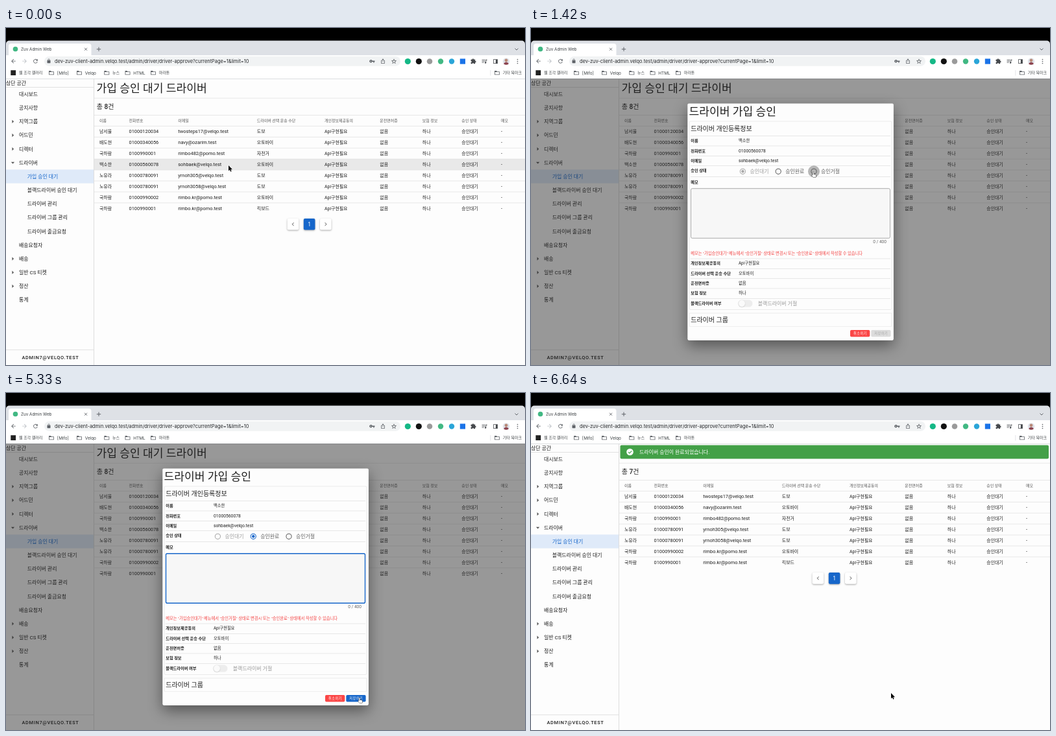
Animation, 800 px wide and 520 px high, one loop 6.73 s. Source, as an HTML page with a canvas:

```html
<!DOCTYPE html>
<html lang="ko">
<head>
<meta charset="utf-8">
<title>Admin</title>
<style>
html, body { margin: 0; width: 100%; height: 100%; overflow: hidden; background: #000; }
canvas { display: block; width: 800px; height: 520px; }
</style>
</head>
<body>
<canvas id="stage"></canvas>
<script>
const LOOP = 6730;
const canvas = document.getElementById('stage');
const g = canvas.getContext('2d');
const dpr = window.devicePixelRatio || 1;
canvas.width = 800 * dpr;
canvas.height = 520 * dpr;

const APP = "Roboto, 'Noto Sans CJK KR', sans-serif";
const UI = "Inter, 'Noto Sans CJK KR', sans-serif";
const INK = '#1f1f1f', GREY = '#5f6368', BLUE = '#1666ca', LINE = '#dedede';

// moments of the story, in ms
const OPEN = 500, PICK = 2060, FOCUS = 3560, DONE = 5870, CLOSE = 5930;

const ICON = {
  back: 'M20 11H7.8l5.6-5.6L12 4l-8 8 8 8 1.4-1.4L7.8 13H20z',
  next: 'M4 11h12.2l-5.6-5.6L12 4l8 8-8 8-1.4-1.4 5.6-5.6H4z',
  reload: 'M17.65 6.35A8 8 0 1 0 19.73 14h-2.08A6 6 0 1 1 12 6c1.66 0 3.14.69 4.22 1.78L13 11h7V4z',
  lock: 'M18 8h-1V6A5 5 0 0 0 7 6v2H6a2 2 0 0 0-2 2v10a2 2 0 0 0 2 2h12a2 2 0 0 0 2-2V10a2 2 0 0 0-2-2zM9 8V6a3 3 0 0 1 6 0v2z',
  key: 'M12.65 10A6 6 0 1 0 12.65 14H17v4h4v-4h2v-4zM7 14a2 2 0 1 1 0-4 2 2 0 0 1 0 4z',
  share: 'M11 15V5.8L8.4 8.4 7 7l5-5 5 5-1.4 1.4L13 5.8V15zM4 9h4v2H6v9h12v-9h-2V9h4v13H4z',
  star: 'M12 2l3 7 7.5.6-5.7 5 1.7 7.4-6.5-4-6.5 4 1.7-7.4-5.7-5L9 9zM12 7l-1.6 3.9-4.2.4 3.2 2.8-1 4.1 3.6-2.2 3.6 2.2-1-4.1 3.2-2.8-4.2-.4z',
  puzzle: 'M20 11h-1V7a2 2 0 0 0-2-2h-4V4a2.5 2.5 0 0 0-5 0v1H4a2 2 0 0 0-2 2v4h1.5a2.7 2.7 0 0 1 0 5H2v4a2 2 0 0 0 2 2h4v-1.5a2.7 2.7 0 0 1 5 0V22h4a2 2 0 0 0 2-2v-4h1a2.5 2.5 0 0 0 0-5z',
  queue: 'M2 5h13v2H2zM2 10h13v2H2zM2 15h8v2H2zM17 5h5v3h-3v9a3 3 0 1 1-2-2.8z',
  panel: 'M3 3h18v18H3zM5 5v14h8V5z',
  folder: 'M2 4h8l2 3h10v13H2zM4 9v9h16V9z',
  left: 'M15.4 7.4L14 6l-6 6 6 6 1.4-1.4-4.6-4.6z',
  right: 'M8.6 16.6L10 18l6-6-6-6-1.4 1.4 4.6 4.6z',
  caret: 'M10 17l5-5-5-5z',
  caretDown: 'M7 10l5 5 5-5z'
};
for (const k in ICON) ICON[k] = new Path2D(ICON[k]);
const ARROW = new Path2D('M0 0V16L3.7 12.6 6.1 18.2 8.7 17 6.3 11.6H11.4z');
const HAND = new Path2D('M5 1.5a1.3 1.3 0 0 1 2.6 0V7l5 1c1.3.3 1.9 1.2 1.7 2.4L13.4 16H6.2L2 10.5c-.8-1.2.6-2.3 1.7-1.4L5 10.3z');

const MENU = ['대시보드', '공지사항', '지역그룹', '어드민', '디렉터', '드라이버', '가입 승인 대기',
  '블랙드라이버 승인 대기', '드라이버 관리', '드라이버 그룹 관리', '드라이버 출금요청',
  '배송요청자', '배송', '일반 CS 티켓', '정산', '통계'];
const CARETS = [2, 3, 4, 12, 13, 14];
const COLS = [144, 189.5, 265.3, 386.8, 491, 576.3, 641.8, 702.3, 763];
const HEAD = ['이름', '전화번호', '이메일', '드라이버 선택 운송 수단', '개인정보제공동의', '운전면허증', '보험 정보', '승인 상태', '메모'];
const REST = ['Api구현필요', '없음', '하나', '승인대기', '-'];
const PEOPLE = [
  ['남서율', '01000120034', 'twosteps17@velqo.test', '도보'],
  ['배도현', '01000340056', 'navy@ozarim.test', '오토바이'],
  ['국하람', '0100990001', 'rimbo482@pomo.test', '자전거'],
  ['백소한', '01000560078', 'sohbaek@velqo.test', '오토바이'],
  ['노유라', '01000780091', 'yrnoh305@velqo.test', '도보'],
  ['노유라', '01000780091', 'yrnoh3058@velqo.test', '도보'],
  ['국하람', '01000990002', 'rimbo.kr@pomo.test', '오토바이'],
  ['국하람', '0100990001', 'rimbo.kr@pomo.test', '킥보드']
];
const CHOSEN = PEOPLE[3];

// pointer stops: time, x, y
const PATH = [[30, 343, 212], [180, 362, 210], [1240, 362, 210], [1410, 435, 222], [1500, 436, 222],
  [1760, 381, 222], [2480, 381, 222], [2640, 425, 290], [2850, 425, 290], [3000, 480, 447],
  [3180, 480, 447], [3500, 430, 285], [3850, 430, 285], [4470, 556, 486], [4550, 556, 486],
  [5000, 545, 470], [5300, 545, 470], [5800, 555, 463]];

const clamp = v => Math.max(0, Math.min(1, v));
const smooth = v => v * v * (3 - 2 * v);

function bezier(x1, y1, x2, y2, x) {
  const at = (a, b, u) => 3 * (1 - u) * (1 - u) * u * a + 3 * (1 - u) * u * u * b + u * u * u;
  let lo = 0, hi = 1;
  for (let i = 0; i < 24; i++) {
    const mid = (lo + hi) / 2;
    if (at(x1, x2, mid) < x) lo = mid; else hi = mid;
  }
  return at(y1, y2, lo);
}

function pointer(t) {
  let a = PATH[0];
  for (const b of PATH) {
    if (t < b[0]) {
      const k = smooth(clamp((t - a[0]) / (b[0] - a[0])));
      return [a[1] + (b[1] - a[1]) * k, a[2] + (b[2] - a[2]) * k];
    }
    a = b;
  }
  return [a[1], a[2]];
}

// y is the middle of the line
function text(s, x, y, size, color = INK, o = {}) {
  if (/[가-힣]/.test(s)) size *= 0.935;
  g.font = `${o.weight || 400} ${size}px ${o.font || APP}`;
  g.textAlign = o.align || 'left';
  g.letterSpacing = (o.gap || 0) + 'px';
  g.fillStyle = color;
  g.fillText(s, x, y + size * 0.36);
}

function rect(x, y, w, h, color) {
  g.fillStyle = color;
  g.fillRect(x, y, w, h);
}

function round(x, y, w, h, r, fill, stroke, width = 0.6) {
  g.beginPath();
  g.roundRect(x, y, w, h, r);
  if (fill) { g.fillStyle = fill; g.fill(); }
  if (stroke) { g.strokeStyle = stroke; g.lineWidth = width; g.stroke(); }
}

function disc(x, y, r, color) {
  g.beginPath();
  g.arc(x, y, r, 0, 7);
  g.fillStyle = color;
  g.fill();
}

function stroke(points, color, width) {
  g.beginPath();
  points.forEach(p => g.lineTo(p[0], p[1]));
  g.strokeStyle = color;
  g.lineWidth = width;
  g.stroke();
}

function icon(name, x, y, size = 10, color = GREY) {
  g.save();
  g.translate(x - size / 2, y - size / 2);
  g.scale(size / 24, size / 24);
  g.fillStyle = color;
  g.fill(ICON[name], 'evenodd');
  g.restore();
}

function shadow(color, blur, dy) {
  g.shadowColor = color;
  g.shadowBlur = blur * dpr;
  g.shadowOffsetY = dy * dpr;
}

function browser() {
  rect(0, 0, 800, 30, '#000');
  round(0, 19.5, 800, 30, [5, 5, 0, 0], '#dee1e6');
  round(4, 24, 127.5, 20, [4, 4, 0, 0], '#fff');
  rect(0, 42, 800, 36, '#fff');
  disc(14.5, 32.5, 3.8, '#41b883');
  text('Zuv Admin Web', 23, 32.7, 6.35, '#3c4043', { font: UI });
  const x = 123, y = 32.7;
  stroke([[x - 2, y - 2], [x + 2, y + 2]], GREY, 0.9);
  stroke([[x + 2, y - 2], [x - 2, y + 2]], GREY, 0.9);
  stroke([[139.8, y], [146.2, y]], GREY, 1);
  stroke([[143, y - 3.2], [143, y + 3.2]], GREY, 1);
  stroke([[784.5, 31.5], [787, 34], [789.5, 31.5]], GREY, 1);

  round(59, 43.7, 549, 15, 7.5, '#f1f3f4');
  icon('back', 11.5, 51.2);
  icon('next', 28.5, 51.2, 10, '#bdc1c6');
  icon('reload', 45.5, 51.2);
  icon('lock', 66, 51, 7.5);
  text('dev-zuv-client-admin.velqo.test/admin/driver/driver-approve?currentPage=1&limit=10', 75, 51.2, 7.41, '#26282b', { font: UI });
  icon('key', 564.3, 51.2, 9);
  icon('share', 581, 51, 9);
  icon('star', 598, 51.2, 9.5);

  disc(619.3, 51.5, 4.6, '#15b886');
  disc(636.3, 51.5, 4.6, '#111');
  disc(653, 51.5, 4.3, '#9a9a9a');
  disc(670, 51.5, 4.2, '#41b883');
  disc(687, 51.5, 4.2, '#2aa5d8');
  rect(699.8, 47.4, 8.2, 8.2, '#1a73e8');
  icon('puzzle', 720.5, 51.3, 9.5, '#45484c');
  icon('queue', 737.5, 51.5, 9.5, '#45484c');
  icon('panel', 754.5, 51.5, 9, '#45484c');
  g.save();
  g.beginPath();
  g.arc(771, 51.5, 5.2, 0, 7);
  g.clip();
  rect(765, 46, 12, 12, '#dfe3ea');
  disc(771, 50, 2.4, '#b98a78');
  disc(771, 57, 4.3, '#8d4450');
  g.restore();
  for (let i = -1; i < 2; i++) disc(788.5, 51.5 + i * 3, 0.85, GREY);

  rect(7.3, 65.2, 7.8, 7.8, '#222');
  text('웹 조각 갤러리', 20, 69.2, 6.4, '#3c4043', { font: UI });
  [[70, '[Mifo]'], [113, 'Velqo'], [155.3, '뉴스'], [187.5, 'HTML'], [227, '마라톤'], [757, '기타 북마크']].forEach(([fx, s]) => {
    icon('folder', fx, 69.2, 9.5);
    text(s, fx + 8.8, 69.2, 6.4, '#3c4043', { font: UI });
  });
  rect(746.6, 65, 0.6, 8.5, '#d0d3d7');
}

function sidebar() {
  rect(135, 78, 0.8, 442, '#d6d6d6');
  text('상단 공간', 0, 85, 8.46);
  rect(0, 91, 135, 0.7, '#d6d6d6');
  MENU.forEach((s, i) => {
    const y = 102 + i * 21.17, active = i === 6;
    if (active) rect(0, y - 10.6, 135, 21.2, '#dfeaf9');
    text(s, i > 5 && i < 11 ? 32.8 : 20, y, 8.46, active ? BLUE : INK);
    if (CARETS.includes(i)) icon('caret', 10.5, y, 12.7, '#555');
    if (i === 5) icon('caretDown', 10.5, y, 12.7, '#555');
  });
  rect(0, 496.4, 135, 0.7, '#d6d6d6');
  text('ADMIN7@VELQO.TEST', 68.5, 508.5, 7.41, INK, { weight: 500, gap: 0.66, align: 'center' });
}

function pageButton(x, y, current) {
  g.save();
  shadow('rgba(0,0,0,.35)', 2.5, 1);
  round(x - 8.8, y - 8.8, 17.6, 17.6, 2.1, current ? BLUE : '#fff');
  g.restore();
}

function list(t) {
  const done = t >= DONE;
  const rows = done ? PEOPLE.filter(p => p !== CHOSEN) : PEOPLE;
  if (done) {
    round(137.5, 80.6, 660.5, 21, 2, '#43a047');
    disc(152.5, 91, 5.3, '#fff');
    stroke([[149.9, 91.1], [151.8, 93], [155.3, 89.4]], '#43a047', 1.1);
    text('드라이버 승인이 완료되었습니다.', 167, 91, 8.5, '#fff');
  } else {
    text('가입 승인 대기 드라이버', 139.5, 93, 18.3);
  }
  rect(136, 107.8, 664, 0.7, LINE);
  text(`총 ${rows.length}건`, 139.8, 121, 10.7, INK, { weight: 500 });
  rect(136, 134, 664, 0.7, LINE);
  HEAD.forEach((s, i) => text(s, COLS[i], 142.6, 6.4, '#555', { weight: 500 }));
  rows.forEach((p, r) => {
    const y = 159.6 + r * 16.95;
    if (r === 3 && t < OPEN) rect(136, y - 8.4, 664, 16.9, '#e9e9e9');
    rect(136, y - 8.7, 664, 0.7, LINE);
    p.concat(REST).forEach((s, i) => text(s, COLS[i], y, 7.41));
  });
  const py = 167.2 + rows.length * 16.95;
  [442.4, 467.6, 492.8].forEach((x, i) => pageButton(x, py, i === 1));
  icon('left', 442.4, py, 11, '#777');
  icon('right', 492.8, py, 11, '#777');
  text('1', 467.6, py, 8.46, '#fff', { align: 'center' });
}

function radio(x, label, on, off, near) {
  const y = 221.3;
  const ring = off ? '#a8a8a8' : on ? BLUE : '#606060';
  if (near) disc(x, y, 9, on ? 'rgba(22,102,202,.2)' : 'rgba(0,0,0,.28)');
  g.beginPath();
  g.arc(x, y, 4.1, 0, 7);
  g.strokeStyle = ring;
  g.lineWidth = 1.05;
  g.stroke();
  if (on) disc(x, y, 2.2, ring);
  text(label, x + 11, y, 8.46, off ? '#9c9c9c' : '#626262');
}

function button(x, label, fill, color) {
  round(x, 466, 30.3, 10.6, 1.8, fill);
  text(label, x + 15.4, 471.3, 5.5, color, { weight: 500, gap: 0.45, align: 'center' });
}

function dialog(t, px, py) {
  const k = bezier(0.25, 0.8, 0.25, 1, clamp((t - OPEN) / 300));
  const picked = t >= PICK;
  g.save();
  g.globalAlpha = k;
  g.translate(400, 299.3);
  g.scale(0.5 + k / 2, 0.5 + k / 2);
  g.translate(-400, -299.3);

  g.save();
  shadow('rgba(0,0,0,.45)', 22, 8);
  round(241.3, 116.5, 317.6, 365.4, 2.1, '#fdfdfd');
  g.restore();
  text('드라이버 가입 승인', 243.5, 129, 18.3);

  round(244, 144, 312, 290.5, 2, null, LINE);
  text('드라이버 개인등록정보', 246.2, 155.2, 10.7, INK, { weight: 500 });
  const lines = [166, 181.6, 197, 212.2, 229, 355.6, 371, 386.2, 401.6, 417];
  lines.forEach(y => rect(246, y, 308, 0.7, LINE));
  [['이름', 174, CHOSEN[0]], ['전화번호', 189.4, CHOSEN[1]], ['이메일', 204.8, CHOSEN[2]], ['승인 상태', 220.2],
    ['메모', 237.8], ['개인정보제공동의', 363.2, REST[0]], ['드라이버 선택 운송 수단', 378.6, CHOSEN[3]],
    ['운전면허증', 393.8, REST[1]], ['보험 정보', 409.2, REST[2]], ['블랙드라이버 여부', 424.7]
  ].forEach(([label, y, value]) => {
    text(label, 246.2, y, 6.65, INK, { weight: 700 });
    if (value) text(value, 320, y, 6.77);
  });

  const near = x => Math.hypot(px - x, py - 221) < 10;
  radio(326.4, '승인대기', !picked, true, false);
  radio(381.2, '승인완료', picked, false, near(381));
  radio(436, '승인거절', false, false, near(436));

  const over = px > 246 && px < 554 && py > 247 && py < 325;
  const focus = t >= FOCUS;
  round(246.5, 247.7, 307, 76.6, 2.1, '#f7f7f7', focus ? BLUE : over && picked ? '#222' : '#969696', focus ? 1.4 : 0.8);
  text('0 / 400', 548, 330, 6.6, '#666', { align: 'right' });
  text('메모는 "가입승인대기" 메뉴에서 "승인거절" 상태로 변경시 또는 "승인완료" 상태에서 작성할 수 있습니다', 246.2, 348, 6.7, '#f33f3f');

  round(319, 419.6, 22.5, 11, 5.5, '#ededed');
  g.save();
  shadow('rgba(0,0,0,.2)', 1.5, 0.5);
  disc(325, 425.1, 5, '#fafafa');
  g.restore();
  text('블랙드라이버 거절', 349.8, 425.2, 8.5, '#9a9a9a');

  stroke([[244, 460], [244, 440], [556, 440], [556, 460]], LINE, 0.6);
  text('드라이버 그룹', 246.2, 450.4, 10.7, INK, { weight: 500 });
  rect(244, 460, 312, 0.6, '#e6e6e6');

  button(492, '취소하기', '#fb4646', '#fff');
  button(524.3, '저장하기', picked ? BLUE : '#dcdcdc', picked ? '#fff' : '#a6a6a6');

  const bar = 0.55 * (1 - clamp((t - 900) / 190));
  if (bar > 0) round(553.4, 144, 4, 257, 2, `rgba(0,0,0,${bar})`);
  g.restore();
}

function cursor(t, x, y) {
  const onRadio = t > 1240 && t < 2700 && Math.abs(y - 222) < 8 && [381, 436].some(r => Math.abs(x - r) < 9);
  const onSave = t > 4600 && t < CLOSE && x > 524 && x < 555 && y > 466 && y < 477;
  const hand = onRadio || onSave;
  g.save();
  g.translate(x, y);
  g.scale(0.53, 0.53);
  if (hand) g.translate(-6.3, 0);
  g.lineJoin = 'round';
  g.lineWidth = hand ? 1.6 : 2.2;
  g.strokeStyle = hand ? '#000' : '#fff';
  g.fillStyle = hand ? '#fff' : '#000';
  const shape = hand ? HAND : ARROW;
  g.stroke(shape);
  g.fill(shape);
  g.restore();
}

function draw(t) {
  g.setTransform(dpr, 0, 0, dpr, 0, 0);
  const [px, py] = pointer(t);
  rect(0, 78, 800, 442, '#fdfdfd');
  browser();
  sidebar();
  list(t);
  rect(0, 78, 800, 0.8, '#d5d7da');

  const shade = bezier(0.25, 0.8, 0.5, 1, clamp((t - OPEN) / 300)) * (1 - smooth(clamp((t - 5945) / 315)));
  if (shade > 0) rect(0, 78, 800, 442, `rgba(33,33,33,${0.46 * shade})`);
  if (t > OPEN && t < CLOSE) dialog(t, px, py);
  cursor(t, px, py);
}

const start = performance.now();
function tick() {
  draw((performance.now() - start) % LOOP);
  requestAnimationFrame(tick);
}
tick();
</script>
</body>
</html>
```
